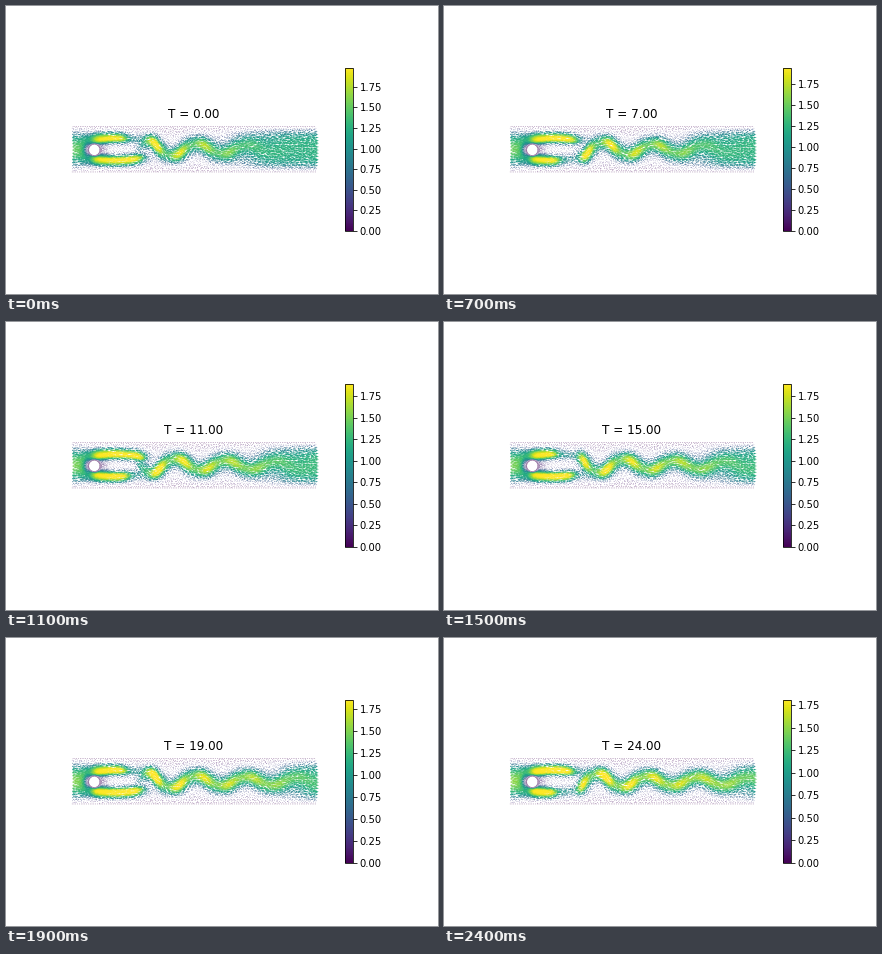
Write a matplotlib script that moves like this. It is 432 by 288 pixels and loops after 2500 ms.

```python
import numpy as np
import matplotlib.pyplot as plt
from matplotlib.animation import FuncAnimation

W, H = 432, 288
FRAMES, STEP = 25, 100

# Channel size in pixels; cylinder centre and radius
LX, LY = 243.5, 45.4
CX, CY, R = 22.1, 22.1, 5.54

# Vortex street: wavelength, shedding period in frames, drift per frame
WAVE, PERIOD = 50.0, 19.2
DRIFT = WAVE / PERIOD


def sig(x):
    return 1 / (1 + np.exp(-np.clip(x, -40, 40)))


def make_mesh(gap=1.8, fine=0.7):
    """Irregular triangular mesh that gets finer towards the cylinder."""
    rng = np.random.default_rng(4)
    rows, cols = int(LY / gap / 0.866) + 1, int(LX / gap) + 1
    xs, ys = np.linspace(0, LX, cols), np.linspace(0, LY, rows)
    x, y = np.meshgrid(xs, ys)
    x[1::2] += (xs[1] - xs[0]) / 2
    x[1:-1, 1:-1] += rng.normal(0, 0.22 * gap, (rows - 2, cols - 2))
    y[1:-1, 1:-1] += rng.normal(0, 0.22 * gap, (rows - 2, cols - 2))
    x, y = x.ravel(), y.ravel()

    px, py, r, h = [], [], R, fine
    while r < 20.5:
        n = int(2 * np.pi * r / h)
        a = 2 * np.pi * (np.arange(n) + rng.random()) / n
        noise = 0.2 * h * min(1, (r - R) / 2)
        px.append(CX + r * np.cos(a) + rng.normal(0, noise, n))
        py.append(CY + r * np.sin(a) + rng.normal(0, noise, n))
        r += 0.866 * h
        h = fine + 0.075 * (r - R)
    keep = (np.hypot(x - CX, y - CY) > r - 0.3) & (x <= LX + 0.1)
    return np.concatenate(px + [x[keep]]), np.concatenate(py + [y[keep]])


X, Y = make_mesh()
S = np.clip((Y - LY / 2) / (LY / 2), -1, 1)
DX, DY = X - CX, Y - CY
RAD = np.hypot(DX, DY)
GAP = np.maximum(RAD - R, 0)
WALL = 1 - S**8


def shear_layer(cycle, side):
    """Fast layer shed from one side of the cylinder (side is +1 or -1)."""
    f = (cycle - 0.75) % 1
    tip = 44 + 34 * f
    offset = 11 - 3.5 * np.exp(-np.maximum(X - 16, 0) / 6)
    offset = offset - 0.08 * np.maximum(X - 45, 0)
    d = side * (Y - 22.7) - offset
    width = np.where(d < 0, 5.0, 7.3)
    neck = 1 - 0.7 * max(0, (f - 0.8) / 0.2) * np.exp(-((X - 54) / 7) ** 2)
    power = (0.7 + 1.22 * sig((tip - X) / 3) * neck) * sig((78 - X) / 4)
    return power * np.exp(-(d / width) ** 2)


def street(t):
    """Meandering jet downstream: speed and direction."""
    k = 2 * np.pi / WAVE
    phase = k * (X - 80.8 - DRIFT * t + 5)
    far = np.maximum(X - 78, 0)
    amp = 4 + 4.5 * np.exp(-far / 40)
    centre = 23 + amp * np.cos(phase)
    angle = np.arctan(-amp * k * np.sin(phase))
    width = 9.5 - 2 * np.exp(-far / 50)
    peak = 1.28 + 0.22 * np.exp(-far / 45)
    peak = peak * (1 + 0.28 * np.exp(-far / 75) * np.cos(2 * phase - 1.3))
    d = (Y - centre) * np.cos(angle)
    jet = 0.32 * (1 - S**2) + peak * np.exp(-(d / width) ** 2)
    # The waves are still spreading into a steady outflow
    front = sig((170 + DRIFT * t - X) / 14)
    speed = front * jet * WALL + (1 - front) * 1.25 * (1 - S**4)
    return speed, angle * front


def flow(t):
    cycle = t / PERIOD
    inlet = 1.5 * (1 - S**2) * (1 - np.exp(-(GAP / 5.5) ** 2))
    layers = shear_layer(cycle, 1) + shear_layer(cycle + 0.5, -1)
    near = 0.25 * (1 - S**2) * (1 - np.exp(-GAP / 6))
    near = (near + layers) * WALL * (1 - np.exp(-(GAP / 1.3) ** 2))
    behind = sig((X - 17) / 2.5)
    near = (1 - behind) * inlet + behind * near

    jet, tilt = street(t)
    mix = sig((X - 65) / 3)
    speed = (near**4 * (1 - sig((X - 90) / 4)) + (jet * mix) ** 4) ** 0.25

    q = R**2 / RAD**4
    around = np.arctan2(-2 * q * DX * DY, 1 - q * (DX**2 - DY**2))
    angle = (1 - mix) * around + mix * tilt
    speed = np.clip(speed, 0, top_speed(t))
    return speed * np.cos(angle), speed * np.sin(angle), speed


def top_speed(t):
    return np.interp(t, [0, 3, 7, 11, 15, 19, 24],
                     [1.983, 1.947, 1.945, 1.895, 1.893, 1.858, 1.81])


fig = plt.figure(figsize=(W / 72, H / 72), dpi=72, facecolor="white")
mid = 144.72
ax = fig.add_axes([54 / W, (mid - 24.96) / H, 267.84 / W, 49.92 / H])
ax.set_axis_off()
u, v, c = flow(0)
arrows = ax.quiver(X, Y, u, v, c, cmap="viridis")
ax.set_xlim(-12.17, 255.67)
ax.set_ylim(-2.27, 47.65)
title = ax.set_title("T = 0.00", fontsize=12)

cax = fig.add_axes([338.58 / W, (mid - 81.54) / H, 8.154 / W, 163.08 / H])
arrows.set_clim(0, top_speed(0))
bar = fig.colorbar(arrows, cax=cax, ticks=np.arange(0, 2, 0.25), format="%.2f")


def update(t):
    arrows.set_UVC(*flow(t))
    arrows.set_clim(0, top_speed(t))
    title.set_text(f"T = {t:.2f}")
    return arrows, title


anim = FuncAnimation(fig, update, frames=FRAMES, interval=STEP,
                     repeat=True, repeat_delay=0, blit=False)
plt.show()
```
